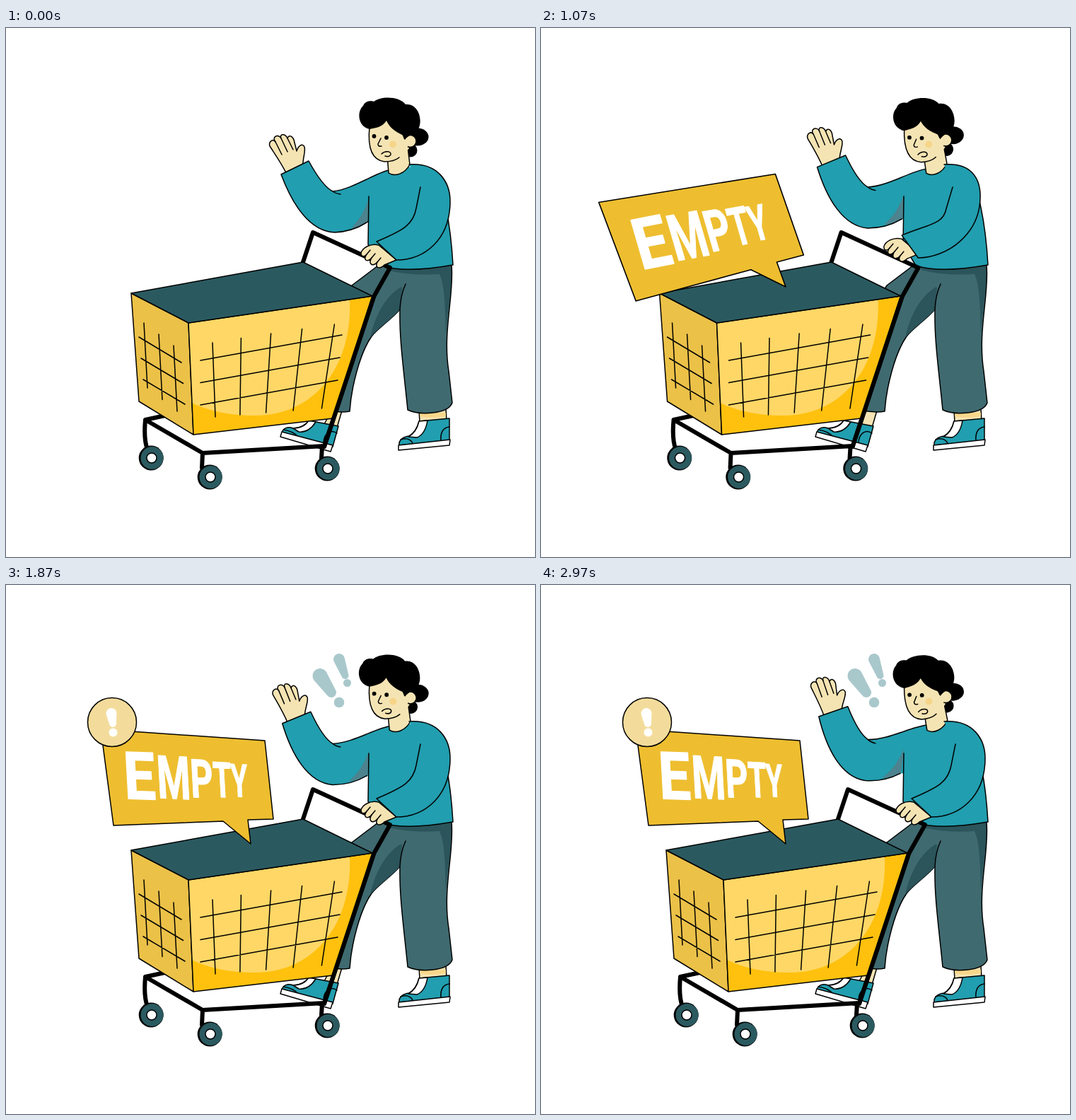
An HTML page that plays this animation: 748x748 px, repeating every 3000 ms.

```html
<!DOCTYPE html>
<html lang="en">
<head>
<meta charset="utf-8">
<title>Empty cart</title>
<style>
  html, body { margin: 0; width: 100%; height: 100%; overflow: hidden; background: #fff; }
  svg { display: block; width: 748px; height: 748px; }
  .ln { fill: none; stroke: #000; stroke-width: 1.5; stroke-linecap: round; stroke-linejoin: round; }
  .ol { stroke: #000; stroke-width: 1.5; stroke-linejoin: round; }
  .bar { fill: none; stroke: #000; stroke-width: 6; stroke-linecap: round; stroke-linejoin: round; }
  .skin { fill: #f5e4b3; }
  .knit { fill: #219eaf; }
  .pants { fill: #3f6a70; }
  .shade { fill: #2b545b; }
  .deep { fill: #2a5a60; }
  .mark { fill: #a9c8cc; }
  .word { font: 700 93px Roboto, Arial, sans-serif; fill: #fff; stroke: #fff; stroke-width: 1.5; stroke-linejoin: round; }
</style>
</head>
<body>
<svg viewBox="0 0 748 748">
  <g id="legs">
    <path class="skin ol" d="M462,538 L475,541 L468,565 L450,560Z"/>
    <path class="knit ol" d="M428,555 L470,563 L462,592 L390,572 C392,566 398,563 406,566 C416,566 424,561 428,555Z"/>
    <path class="ol" fill="#fff" d="M406,566 C416,566 424,562 428,555 L438,557 C431,568 423,572 414,571Z"/>
    <path class="ln" d="M449,587 C449,575 458,566 468,573 M392,568 Q406,570 413,578"/>
    <path class="ol" fill="#fff" d="M390,571 L462,590 L459,599 L388,578Z"/>
    <path class="pants ol" d="M530,333 L489,364 L455,420 L440,538 Q470,545 486,542 C488,510 500,460 517,436 C525,425 545,412 557,398 L570,362 L570,340Z"/>
    <path class="shade" d="M563,364 C541,374 523,401 515,438 C525,425 545,412 557,398Z"/>

    <path class="skin ol" d="M584,540 L622,538 L623,557 L585,558Z"/>
    <path fill="#f8d78a" d="M585,544 L622,544 L622,549 Q600,553 585,549Z"/>
    <path class="knit ol" d="M584,556 L627,552 L627,584 L556,590 C555,582 562,578 570,577 C578,572 582,565 584,556Z"/>
    <path class="ol" fill="#fff" d="M569,578 C578,573 582,565 584,556 L596,555 C594,567 589,576 581,579Z"/>
    <path class="ln" d="M615,584 C614,572 618,565 627,564 M558,582 Q570,578 575,587"/>
    <path class="ol" fill="#fff" d="M555,590 L628,582 L627,590 L555,597Z"/>
    <path class="pants" d="M536,333 L630,333 C634,375 617,430 626,485 L631,530 C625,546 585,548 568,540 C562,480 556,440 557,398 L560,368Z"/>
    <path class="shade" d="M538,338 L630,336 C631,370 624,400 622,432 C621,400 621,365 613,348 Q570,351 538,342Z"/>
    <path class="ln" d="M630,336 C634,375 617,430 626,485 L631,530 C625,546 585,548 568,540 C562,480 556,440 557,398 Q558,377 565,362"/>
  </g>

  <g id="wave">
    <path class="skin ol" d="M398,209 C392,195 380,178 373,167 C371,161 377,156 381,161 C375,154 385,149 389,156 C386,149 395,149 398,156 C400,150 405,153 407,158 L411,174 C413,167 419,162 422,168 C424,175 419,185 420,195Z"/>
    <path class="ln" d="M381,161 L390,179 M389,156 L398,175 M398,156 L406,172"/>
    <path class="knit" d="M389,207 L428,188 C440,210 452,226 462,231 C490,228 520,206 541,201 L565,215 L545,270 L512,273 C500,282 485,288 465,289 C430,288 405,250 389,207Z"/>
    <path fill="#4c838e" d="M514,238 C506,262 500,270 488,283 Q502,281 514,273Z"/>
    <path class="ln" d="M541,201 C520,206 490,228 462,231 C452,226 440,210 428,188 L389,207 C405,250 430,288 465,289 C485,288 500,282 513,273 M462,231 Q466,234 473,235"/>
  </g>
  <path class="knit" d="M513,238 L512,306 L530,336 Q565,347 632,335 C630,300 626,270 620,245 L600,213 L570,196 L545,205Z"/>
  <path class="ln" d="M513,238 L512,306 L530,336 Q565,347 632,335 C630,300 626,270 620,245"/>

  <g id="head">
    <ellipse cx="582" cy="154" rx="15.5" ry="12.5"/>
    <circle cx="572" cy="173" r="9.5"/>
    <path class="skin ol" d="M539,180 L541,205 C550,211 564,206 571,193 L568,168Z"/>
    <path class="skin" d="M514,138 C512,160 513,186 535,189 C555,190 562,180 570,170 L566,140 L538,122Z"/>
    <path class="ln" d="M514,140 C512,160 513,186 535,189 Q549,189 556,183"/>
    <circle class="skin ol" cx="571.5" cy="160" r="8.5"/>
    <path class="skin" d="M559,150 L567,152 L568,168 L559,172Z"/>
    <circle cx="547" cy="164.5" r="5" fill="#f6d58a"/>
    <circle cx="520.5" cy="153" r="2.9"/>
    <circle cx="538" cy="155" r="2.9"/>
    <path class="ln" d="M530,156 L526,164 Q526,168 531,167 M531,178 C536,173 545,174 544,179 Q542,183 536,181"/>
    <path d="M514,143 C497,139 496,118 505,110 C508,102 518,103 520,104 C530,96 556,96 565,108 C583,106 590,130 583,143 C580,150 570,150 564,158 C562,157 562,153 560,151 C549,146 542,140 538,131 C532,140 524,141 514,143Z"/>
  </g>

  <g id="cart">
    <path class="bar" d="M420,331 L434,289 L543,339 L520,380 L450,592"/>
    <path class="bar" d="M225,548 L197,554 L278,601 L450,591 M197,554 C195,575 197,588 200,596 M278,601 L277,622 M447,592 L446,608"/>
    <g id="wheels"></g>
    <path class="ol" fill="#ebc148" d="M177,375 L258,417 L265,575 L188,528Z"/>
    <path fill="#ffc10e" d="M258,417 L518,379 L462,552 L265,575Z"/>
    <path fill="#ffd766" d="M258,417 L486,384 C490,480 435,548 352,548 C315,548 285,541 263,530Z"/>
    <path class="ln" d="M258,417 L518,379 L462,552 L265,575Z"/>
    <path class="deep ol" d="M177,375 L420,331 L518,379 L258,417Z"/>
    <path id="mesh" class="ln"/>
    <path class="bar" d="M520,380 L450,592"/>
  </g>

  <g id="grip">
    <path class="skin ol" d="M527,307 C515,304 504,311 502,318 C502,324 507,324 510,320 C504,328 511,332 517,325 C511,334 519,338 525,331 C521,339 528,342 535,335 L552,328Z"/>
    <path class="ln" d="M510,320 L515,314 M517,325 L522,319 M525,331 L530,325"/>
  </g>
  <path id="armFill" class="knit"/>
  <path id="armLine" class="ln"/>

  <g id="bubble">
    <path class="ol" fill="#eebe30" d="M134,204 L366,220 L378,331 L342,332 L346,366 L307,334 L152,340Z"/>
    <g id="word" class="word"></g>
  </g>
  <g id="big" class="mark"></g>
  <g id="small" class="mark"></g>
  <g id="badge" fill="#fff"><circle class="ol" cx="150" cy="194" r="34.5" fill="#f3dc9b"/></g>
</svg>
<script>
const $ = id => document.getElementById(id);
const add = (id, html) => $(id).insertAdjacentHTML('beforeend', html);
const LOOP = 3000;

function wheel(x, y) {
  add('wheels', `<circle cx="${x - 0.8}" cy="${y}" r="17.5"/>
    <circle class="deep" cx="${x + 0.5}" cy="${y}" r="16"/>
    <circle class="ol" cx="${x}" cy="${y}" r="7" fill="#fff"/>`);
}
wheel(206, 608);
wheel(289, 635);
wheel(455, 623);

// Wire mesh: spacing widens towards the handle
function mesh() {
  const line = (x1, y1, x2, y2) => `M${x1},${y1} L${x2},${y2}`;
  let d = '';
  for (let i = 0; i < 5; i++) {
    const grow = 0.9 * i * i;
    d += line(292 + 39.5 * i + grow, 445 - 6.5 * i, 296 + 34 * i + grow, 550 - 3 * i);
  }
  for (let i = 0; i < 3; i++) {
    d += line(275, 470 + 31.5 * i, 475 - 3 * i, 434 + 32 * i);
    d += line(195 + 21 * i, 417 + 16 * i, 200 + 21 * i, 509 + 16.5 * i);
    d += line(188 + 3 * i, 437 + 30 * i, 248 + 2.5 * i, 473 + 29.5 * i);
  }
  return d;
}
$('mesh').setAttribute('d', mesh());

// Letters shrink with distance from the left edge of the sign
function letter(ch, x, narrow) {
  const far = x - 168, s = 1 - far / 500;
  add('word', `<text transform="matrix(${s * narrow} ${0.03 * s} ${0.055 * s} ${s} ${x} ${302 - far / 50})">${ch}</text>`);
}
letter('E', 168, 0.86);
letter('M', 215, 0.64);
letter('P', 262, 0.66);
letter('T', 294, 0.61);
letter('Y', 319, 0.6);

// Exclamation mark: tapered capsule plus dot
function exclaim(id, [x1, y1, r1], [x2, y2, r2], [x, y, r]) {
  const d = Math.hypot(x2 - x1, y2 - y1), nx = (y1 - y2) / d, ny = (x2 - x1) / d;
  add(id, `<path d="M${x1 + nx * r1},${y1 + ny * r1} A${r1},${r1} 0 0 1 ${x1 - nx * r1},${y1 - ny * r1}
    L${x2 - nx * r2},${y2 - ny * r2} A${r2},${r2} 0 0 1 ${x2 + nx * r2},${y2 + ny * r2}Z"/>
    <circle cx="${x}" cy="${y}" r="${r}"/>`);
}
exclaim('big', [444, 128.5, 10.5], [460, 152, 7], [471, 166, 7.3]);
exclaim('small', [471, 105, 8], [479.5, 128, 5], [482.5, 138.5, 5.5]);
exclaim('badge', [149, 181.5, 7.5], [151, 196, 5], [151.5, 208.5, 6]);

// Timing rules, all from 0 to about 1
const cosine = p => (1 - Math.cos(Math.PI * p)) / 2;
const ramp = (t, from, to) => cosine(Math.min(1, Math.max(0, (t - from) / (to - from))));
const nudge = (t, start, len) =>
  ramp(t, start, start + 0.29 * len) - ramp(t, start + 0.42 * len, start + len);
const pop = (t, start, rise, over) =>
  over * ramp(t, start, start + rise) - (over - 1) * ramp(t, start + rise, start + 2 * rise);
const dip = (t, start, len, depth) =>
  depth * (ramp(t, start, start + len / 2) - ramp(t, start + len / 2, start + len));
const sway = (t, start, half) => t < start ? 0 : cosine((t - start) / half);

// Sleeve outline; k is how far the arm is pushed forward
function sleeve(k) {
  const sx = 628 - 7 * k, sy = 245 - 7 * k;
  const bx = 552 - 19 * k, by = 328 - 3 * k;
  const cx = 524 - 14 * k, cy = 302 - 9 * k;
  const ex = 580 - 7 * k;
  return `M570,193 C${612 - 4 * k},190 ${sx},${sy - 26} ${sx},${sy}
    C${sx},${sy + 54} ${bx + 40},${by} ${bx},${by} L${cx},${cy}
    C${cx + 38},${cy - 16} ${ex - 4},278 ${ex},255 L${586 - 4 * k},225`;
}

const place = (id, tf) => $(id).setAttribute('transform', tf);
const grow = (id, x, y, s, r = 0) =>
  place(id, `translate(${x} ${y}) rotate(${r}) scale(${s}) translate(${-x} ${-y})`);

function draw(t) {
  const push = nudge(t, 370, 1500) + nudge(t, 1870, 1100);
  place('cart', `translate(${-9.6 * push} 0)`);
  place('grip', `translate(${-17.5 * push} ${-9 * push})`);
  const d = sleeve(push);
  $('armFill').setAttribute('d', d);
  $('armLine').setAttribute('d', d);

  place('head', `rotate(${-4.8 * sway(t, 510, 820)} 549 147)`);
  const lift = ramp(t, 760, 1390) - dip(t, 1390, 1580, 0.7);
  place('wave', `rotate(${6.9 * lift} 565 228)`);

  grow('bubble', 346, 366, pop(t, 590, 390, 1.1), -54 * (1 - ramp(t, 600, 1300)));
  grow('big', 471, 166, pop(t, 1130, 200, 1.2) - dip(t, 1970, 600, 0.2));
  grow('small', 482.5, 138.5, pop(t, 1430, 180, 1.22) - dip(t, 2230, 600, 0.15));
  grow('badge', 150, 194, pop(t, 1430, 190, 1.25));
}

function tick() {
  draw(performance.now() % LOOP);
  requestAnimationFrame(tick);
}
tick();
</script>
</body>
</html>
```
